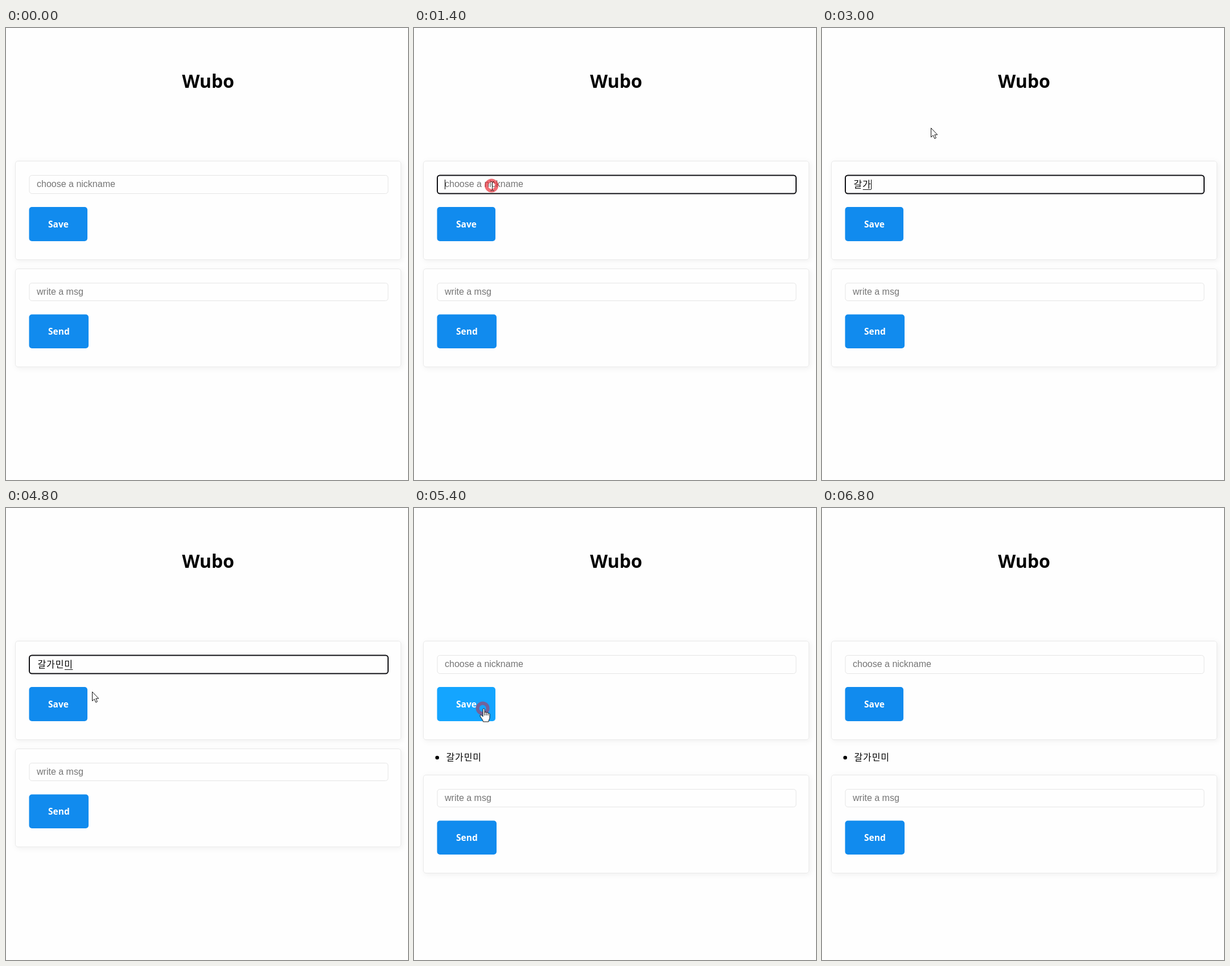
Write an HTML page that moves like this. It is 706x793 px and loops after 7000 ms.

```html
<!DOCTYPE html>
<html lang="ko">
<head>
<meta charset="utf-8">
<title>Nickname form</title>
<style>
html, body { margin: 0; width: 100%; height: 100%; overflow: hidden; background: #fefefe; }
svg { display: block; }
.card { fill: #fefefe; stroke: #e9e9e9; filter: drop-shadow(2px 2px 5px #f0f0f0); }
.field { fill: #fefefe; stroke: #e5e5e5; }
.field.focus { stroke: #101014; stroke-width: 2; }
.button { fill: #118bee; }
.button.hover { fill: #14a5ff; }
.label { font: 700 15.5px "Open Sans", "Noto Sans", sans-serif; fill: #fff; }
.hint { font: 16px "Liberation Sans", Arial, sans-serif; fill: #757575; }
.hangul { font: 300 16px "Noto Sans CJK KR", "Noto Sans CJK", sans-serif; letter-spacing: .9px; }
h1, .title { font: 700 32px "Open Sans", "Noto Sans", sans-serif; }
.pointer { fill: #fff; stroke: #111; stroke-linejoin: round; }
</style>
</head>
<body>
<svg width="706" height="793" viewBox="0 0 706 793">
  <text class="title" x="355" y="105" text-anchor="middle">Wubo</text>

  <rect class="card" x="16.5" y="233.5" width="677" height="173" rx="4.5"/>
  <rect id="field" x="41" y="258.5" width="630" height="32" rx="4.5"/>
  <text id="hint" class="hint" x="54" y="279">choose a nickname</text>
  <text id="typed" class="hangul" x="55.5" y="280"></text>
  <path id="underline" stroke="#111"/>
  <path id="caret" stroke="#000"/>
  <rect id="save" x="40.5" y="314" width="102.5" height="60" rx="5"/>
  <text class="label" x="74" y="350">Save</text>

  <g id="list">
    <circle cx="40.7" cy="438" r="3.3"/>
    <text class="hangul" x="56.5" y="443">갈가민미</text>
  </g>

  <g id="message">
    <rect class="card" x="16.5" y="422.5" width="677" height="172" rx="4.5"/>
    <rect class="field" x="41" y="447.5" width="630" height="31" rx="4.5"/>
    <text class="hint" x="54" y="468">write a msg</text>
    <rect class="button" x="40.5" y="502.5" width="104.5" height="59.5" rx="5"/>
    <text class="label" x="74" y="538">Send</text>
  </g>

  <circle id="ring" fill="none" stroke="#e6141e" stroke-width="6"/>
  <g id="cursor">
    <path id="arrow" class="pointer" d="M.5 .5V16.5L4.2 13.2L6.8 19L9.4 17.8L6.8 12.2H11.7Z"/>
    <path id="beam" fill="none" stroke="#222" d="M-2.5-7.5H-.5L.5-6.5L1.5-7.5H3.5M.5-6.5V7.5M-2.5 8.5H-.5L.5 7.5L1.5 8.5H3.5"/>
    <path id="hand" class="pointer" d="M-.5 1.5C-.5-.5 2.5-.5 2.5 1.5V7C3.5 5.5 5.5 6 5.5 7.5C6.5 6 8.5 6.7 8.5 8.5C9.5 7.3 11.5 8 11.5 10V16C11.5 18.5 9.5 19.5 9.5 23H0C0 19.5-5.5 15-5.5 12.5C-5.5 10.5-3 10.5-.5 14ZM2.5 7V12M5.5 8V12M8.5 9V12"/>
  </g>
</svg>
<script>
const LOOP = 7000, STEP = 200;
const $ = id => document.getElementById(id);
const show = (id, on) => $(id).style.display = on ? "" : "none";
const within = (t, from, to) => t >= from && t < to;

// Each entry holds until the next one: [time, value...]
const cursorTrack = [
  [0, ""], [600, "arrow", 340, 410], [800, "arrow", 225, 318],
  [1000, "beam", 137, 277], [1800, "beam", 146, 290], [2000, "arrow", 191, 175],
  [4800, "arrow", 151, 322], [5000, "hand", 121.5, 352],
  [6200, "arrow", 205, 322], [6400, "arrow", 310, 289], [6600, "arrow", 376, 275], [6800, ""]
];
const typing = [
  [0, ""], [2400, "가"], [2600, "갈"], [2800, "갈ㄱ"], [3000, "갈가"], [3600, "갈감"],
  [3800, "갈가미"], [4000, "갈가민"], [4200, "갈가민ㅁ"], [4400, "갈가민미"], [5400, ""]
];
const rings = [[0, 0], [1200, 6, .65], [1400, 9, .62], [1600, 0], [5200, 6.2, .65], [5400, 9, .45], [5600, 0]];
const at = (track, t) => track.findLast(entry => entry[0] <= t).slice(1);

function draw(now) {
  const t = Math.floor(now % LOOP / STEP) * STEP;
  const [text] = at(typing, t);
  const focus = within(t, 1200, 5200);
  const saved = t >= 5400;
  const end = 55 + 15.6 * text.length;

  $("field").setAttribute("class", focus ? "field focus" : "field");
  $("save").setAttribute("class", within(t, 5000, 6200) ? "button hover" : "button");
  $("typed").textContent = text;
  show("hint", !text);
  show("underline", text && focus);
  $("underline").setAttribute("d", `M${end - 14.5} 283.5H${end}`);
  show("caret", within(t, 1200, 1800) || within(t, 2400, 4600));
  $("caret").setAttribute("d", `M${text ? Math.floor(end) + .5 : 54.5} 266V283`);
  show("list", saved);
  $("message").setAttribute("transform", `translate(0 ${saved ? 46 : 0})`);

  const [shape, x = 0, y = 0] = at(cursorTrack, t);
  for (const id of ["arrow", "beam", "hand"]) show(id, id === shape);
  $("cursor").setAttribute("transform", `translate(${x} ${y})`);

  const [r, alpha] = at(rings, t);
  show("ring", r);
  const ring = { cx: x - .8, cy: y - .5, r, opacity: alpha || 0 };
  for (const key in ring) $("ring").setAttribute(key, ring[key]);
}

const start = performance.now();
function tick() {
  draw(performance.now() - start);
  requestAnimationFrame(tick);
}
tick();
</script>
</body>
</html>
```
